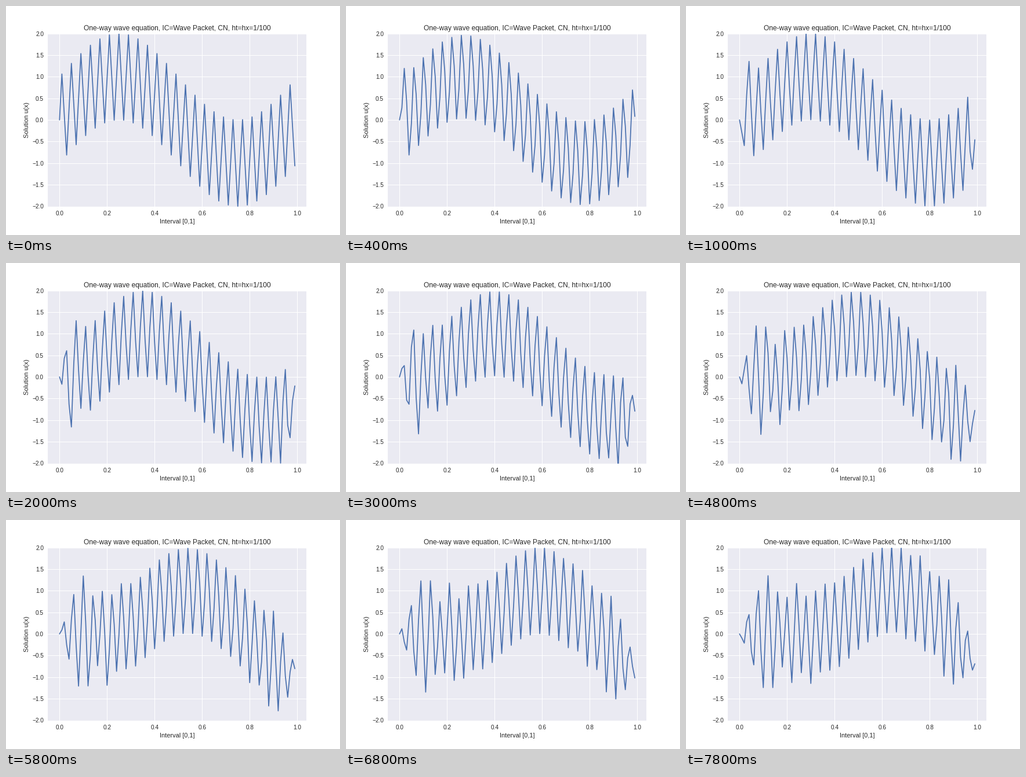
A matplotlib script that plays this animation: 576 px wide and 396 px high, repeating every 8000 ms.

```python
import numpy as np
import matplotlib.pyplot as plt
from matplotlib.animation import FuncAnimation

FRAMES, INTERVAL = 40, 200
N = 100            # grid cells on [0, 1]
RATIO = 1.0        # time step / space step
INK = "0.15"

plt.rcParams.update({
    "font.family": "Liberation Sans",
    "font.size": 10,
    "text.color": INK,
    "axes.labelcolor": INK,
    "axes.unicode_minus": True,
})


def step_matrix():
    """Crank-Nicolson step for u_t + u_x = 0, u = 0 on the left,
    u_N(t + k) = u_{N-1}(t) on the right."""
    new, old = np.eye(N + 1), np.eye(N + 1)
    c = RATIO / 4
    for j in range(1, N):
        new[j, j - 1], new[j, j + 1] = -c, c
        old[j, j - 1], old[j, j + 1] = c, -c
    old[0] = 0
    old[N] = 0
    old[N, N - 1] = 1
    return np.linalg.solve(new, old)


def solve():
    x = np.arange(N + 1) / N
    states = [np.sin(2 * np.pi * x) + np.sin(50 * np.pi * x)]
    step = step_matrix()
    for _ in range(FRAMES - 1):
        states.append(step @ states[-1])
    return x[:N], np.array(states)[:, :N]


x, waves = solve()

fig = plt.figure(figsize=(8, 5.5), dpi=72, facecolor="white")
ax = fig.add_axes([0.125, 0.125, 0.775, 0.755], facecolor="#EAEAF2")
for spine in ax.spines.values():
    spine.set_visible(False)
ax.set_axisbelow(True)
ax.grid(True, color="white", linewidth=1, linestyle="-")
ax.tick_params(length=0, pad=7, labelsize=10, labelcolor=INK)

margin = 0.05 * x[-1]
ax.set_xlim(-margin, x[-1] + margin)
ax.set_ylim(-2, 2)
ax.set_xticks(np.arange(6) / 5)
ax.set_yticks(np.arange(-4, 5) / 2)
ax.set_title("One-way wave equation, IC=Wave Packet, CN, ht=hx=1/100",
             fontsize=12, pad=6)
ax.set_xlabel("Interval [0,1]", fontsize=11, labelpad=4)
ax.set_ylabel("Solution u(x)", fontsize=11, labelpad=4)

line, = ax.plot(x, waves[0], color="#4C72B0", linewidth=1.75,
                solid_capstyle="round")


def draw(i):
    line.set_ydata(waves[i])
    return line,


anim = FuncAnimation(fig, draw, frames=FRAMES, interval=INTERVAL,
                     repeat=True, repeat_delay=0)
plt.show()
```
